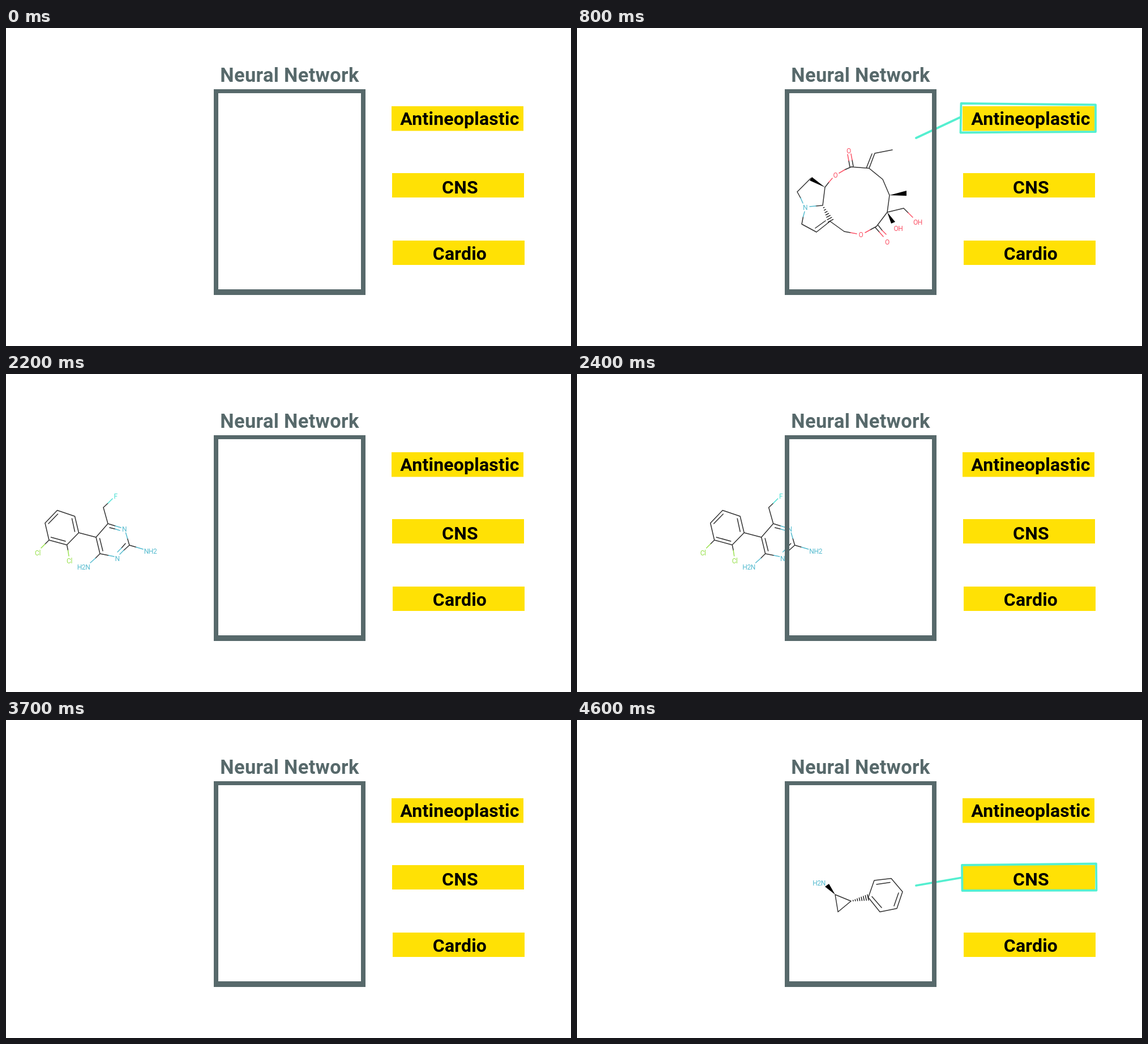
Recreate the animation shown at these times as an HTML page. Size 998 by 561 pixels, loop 5.6 s.

```html
<!DOCTYPE html>
<html lang="en">
<head>
<meta charset="utf-8">
<title>Neural Network</title>
<style>
  html, body { margin: 0; width: 100%; height: 100%; overflow: hidden; background: #fff; }
  svg { display: block; width: 998px; height: 561px; }
  text { text-anchor: middle; font-family: Roboto, sans-serif; }
  .big { font-weight: 700; font-size: 32px; letter-spacing: .2px; }
  .title { font-size: 34.5px; letter-spacing: .3px; fill: #57696b; }
  .atom { font-size: 12px; letter-spacing: -.4px; }
  .bond { fill: none; stroke-width: 1.5; stroke-linecap: round; stroke-linejoin: round; }
  .link { fill: none; stroke: #54efd0; stroke-width: 3.8; stroke-linecap: round; stroke-linejoin: round; }
</style>
</head>
<body>
<svg viewBox="0 0 998 561">
  <g fill="#ffe105">
    <rect x="681" y="138" width="233" height="43.5"/>
    <rect x="682" y="256" width="233" height="43"/>
    <rect x="683" y="375" width="233" height="43"/>
  </g>
  <g id="scene"></g>
  <path fill="#57696b" fill-rule="evenodd" d="M367 108H635V471H367ZM375 115V461H627V115Z"/>
  <text class="big title" x="501" y="95">Neural Network</text>
  <text class="big" x="801.5" y="171">Antineoplastic</text>
  <text class="big" x="802" y="291.5">CNS</text>
  <text class="big" x="801.5" y="409">Cardio</text>
</svg>
<script>
const BLACK = '#333', RED = '#fb5468', BLUE = '#55bbcf', GREEN = '#98e04c', TEAL = '#48dfd3';
const TICK = 100, STEP = 250 / 3, LOOP = 5600;

const bond = (color, d) => `<path class="bond" stroke="${color}" d="${d}"/>`;
const wedge = d => `<path d="${d}Z"/>`;
const atom = (color, label, x, y) =>
  `<text class="atom" fill="${color}" x="${x}" y="${y + 4.5}">${label}</text>`;

// Hashed bond: cross strokes that widen from the first point to the second
function hash(x1, y1, x2, y2, count, width) {
  const dx = x2 - x1, dy = y2 - y1, len = Math.hypot(dx, dy);
  let d = '';
  for (let i = 1; i <= count; i++) {
    const f = i / count, h = width * f / 2;
    const x = x1 + dx * f, y = y1 + dy * f, nx = -dy / len * h, ny = dx / len * h;
    d += `M${x - nx} ${y - ny}L${x + nx} ${y + ny}`;
  }
  return bond('#222', d);
}

const molecules = [
  {
    start: 1, gap: STEP,
    link: 'M599 194L678 157M678.5 133L916 135.5V183L677.5 184.5Z',
    art: bond(BLACK,
        'M413 265L389 289 395 300M399.500 333L397 346 423 360 447 341L472 359 483 361M421 353L439 340' +
        'M422 314L434 313 438 281 445 272M473 250L484.500 245 516 247.500 540 267 552 295 548 325 529 350 518 356' +
        'M516 247.500L526 221 557 215M511.500 246L521 222M548 325L577 318 585 326' +
        'M482 245L480 234M488 244L486 233M527 352L534 360M532 348L539 357') +
      bond(RED,
        'M445 272L451 265M473 250L463 256M480 234L478 223M486 233L484 222M518 356L509 361' +
        'M494 363L483 361M534 360L541 368M539 357L546 364M585 326L593 334') +
      bond(BLUE, 'M395 300L399 309M399.500 333L402 324M422 314L411 315') +
      wedge('M438 281L415 263 411 269') + wedge('M552 295L582 287 582 296') +
      wedge('M548 325L562 342 555 345') + hash(434, 313, 448, 340, 7, 10) +
      atom(RED, 'O', 480, 216) + atom(RED, 'O', 456.5, 259) + atom(RED, 'O', 501.5, 364) +
      atom(RED, 'O', 548, 377) + atom(RED, 'OH', 567.5, 353) + atom(RED, 'OH', 602, 342.5) +
      atom(BLUE, 'N', 403, 316)
  },
  {
    start: 20, gap: 88,
    link: 'M561 321L679 399M681.5 374.5L917 374V422L683 419.500Z',
    art: bond(BLACK,
        'M428.500 240.500L459.500 251 466.500 280 445.500 301.500 414 293 407 263ZM413 264L429.500 247' +
        'M454.500 255L459.500 278M443 295L417.500 288M414 293L407 300M445.500 301.500L447.500 311' +
        'M466.500 280L497 288 518 264 531 268M518 264L510 235.500 518 228M521 271L531 273.500' +
        'M552.500 290L556 302 546 311M549 299L542 307M556 302L568 305.500' +
        'M519 320L504 317 497 288M509 312L503.500 290M504 317L496 325') +
      bond(GREEN, 'M407 300L400 307M447.500 311L449 321') +
      bond(TEAL, 'M518 228L526 220') +
      bond(BLUE,
        'M531 268L541 271M531 273.500L539 276M552.500 290L549.500 280M546 311L539 318' +
        'M542 307L535 314M568 305.500L580 309M519 320L529 322M496 325L487 333') +
      atom(GREEN, 'Cl', 394, 315) + atom(GREEN, 'Cl', 450, 329.5) + atom(TEAL, 'F', 531.5, 215) +
      atom(BLUE, 'N', 547, 273.5) + atom(BLUE, 'N', 534.5, 325.5) +
      atom(BLUE, 'NH2', 593, 312) + atom(BLUE, 'H2N', 475, 340.5)
  },
  {
    start: 39, gap: 100,
    link: 'M599 292L680 278M680 256L917 253.500 917.500 300.500 680.500 301Z',
    art: bond(BLACK,
        'M456 308L484 319.500 461 338.500ZM514.500 313L525 283 555 279.500 575 303 565 332.500 535 338.500Z' +
        'M529 290L553 286.500M568 305L560 328M538 331L521 311.500') +
      wedge('M456 308L445 289 438 294') + hash(484, 319.5, 514, 313, 8, 10) +
      atom(BLUE, 'H2N', 427.5, 287.5)
  }
];

const scene = document.getElementById('scene');
scene.innerHTML = molecules.map(m =>
  `<g><path class="link" d="${m.link}"/><g>${m.art}</g></g>`).join('');

function draw() {
  const tick = Math.floor(performance.now() % LOOP / TICK);
  molecules.forEach(({ start, gap }, i) => {
    const group = scene.children[i], [link, art] = group.children;
    const step = tick - start;
    const x = step < 6 ? -gap - (5 - step) * STEP : 0;
    group.style.display = step >= 0 && step < 17 ? '' : 'none';
    link.style.display = step >= 7 ? '' : 'none';
    art.setAttribute('transform', `translate(${x})`);
  });
  requestAnimationFrame(draw);
}
draw();
</script>
</body>
</html>
```
